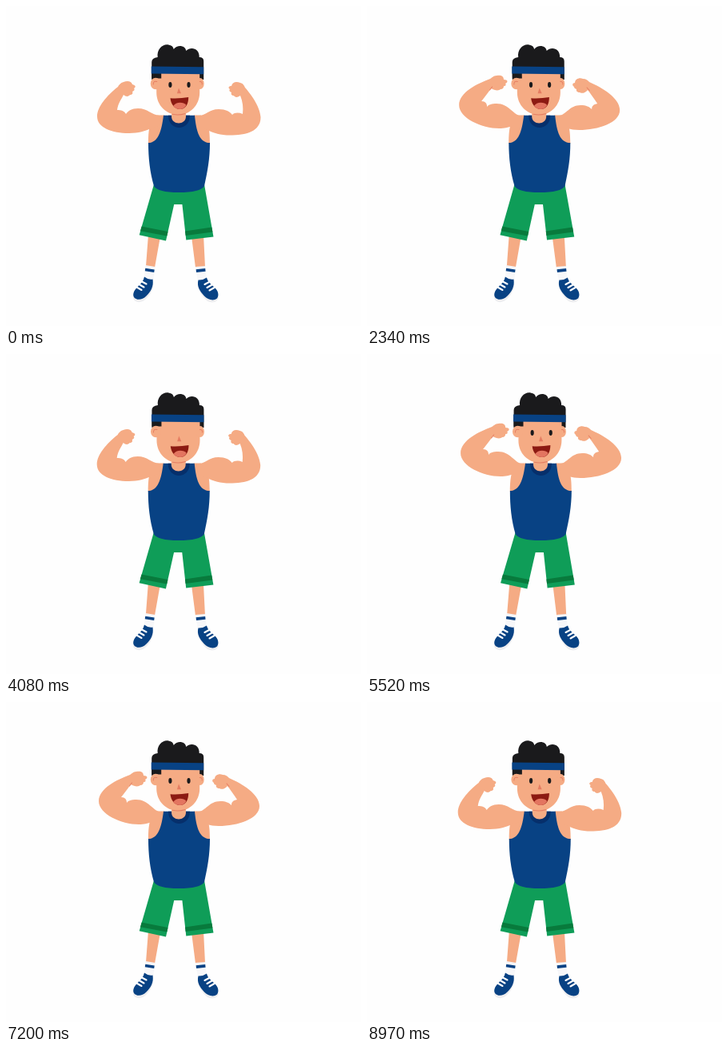
Write an HTML page that moves like this. It is 444x400 px and loops after 9000 ms.

```html
<!DOCTYPE html>
<html lang="en">
<head>
<meta charset="utf-8">
<title>Flexing athlete</title>
<style>
  html, body { margin: 0; width: 100%; height: 100%; overflow: hidden; background: #fefefe; }
  svg { display: block; width: 100vw; height: 100vh; }
  .skin { fill: #f5ab84; }
  .blue { fill: #084284; }
  .navy { fill: #062f6b; }
  .green { fill: #0f9d58; }
  .stripe { fill: #087a3c; }
  .hair { fill: #1a1a1c; }
  .line { fill: none; stroke: #e57d62; stroke-width: 1; stroke-linecap: round; }
  .lace { fill: none; stroke: #fff; stroke-width: 2.1; stroke-linecap: round; }
  .sole { fill: #eeeef0; }
  .sock { fill: #f7f7f9; }
</style>
</head>
<body>
<svg viewBox="0 0 444 400">
  <g id="figure">
    <g id="legs">
      <path class="skin" d="M178 286L193 288L186 327L175 325ZM232 288L247 286L249 326L237 327Z"/>
      <path class="sock" d="M174.500 324L186.500 326L184 344L172.500 341ZM237 326L249 325L251 341L240 344Z"/>
      <path class="blue" d="M174.300 327.700L185.700 329.500L185.200 333L173.800 331.200ZM237.600 329.300L249.200 328.100L249.600 331.700L238.100 332.900Z"/>
      <path class="sole" d="M184 347C184 356 179 363 173 368C167 372 160 370 159 365L165 356ZM240 348C241 357 246 364 252 369C258 372 265 370 266 364L259 356Z"/>
      <path class="blue" d="M173 338.500Q178 342.500 183.500 341.500C185 351 181 357 175.500 362.500C170 368 163 368 160 364C157.500 359 161.500 354 166 349.500Q171.500 345 173 338.500ZM240.500 342.500Q246 343 251 339.500C252.500 345.500 257 348 261 352C266 356.500 266.500 362 264 365.500C259 369.500 252 366.500 248 362.500C242 356 238.500 350 240.500 342.500Z"/>
      <path class="lace" d="M170 344.500L175.500 347.500M166.500 348L172.500 351.500M163.500 351.500L169.500 355M254 345L248.500 348M257.500 348.500L251.500 352M260.500 352L254.500 355.500"/>
    </g>
    <path class="green" d="M185 223L166.700 286.300L200 293.500L210.200 248H220.400L225.300 292.500L259.500 288.500L248 223Z"/>
    <path class="stripe" d="M169.600 275.500L202.500 282L201.300 287.500L168 281.200ZM224 281.500L257.300 276.500L258.400 282.500L224.700 287Z"/>

    <path class="skin" d="M198 136.500H189C181 143 178 149 178 172H198ZM235 136.500H244C252 143 255 149 255 172H235Z"/>
    <path id="armL" class="skin"/>
    <path id="armR" class="skin"/>
    <path id="creases" class="line" d="M154.500 105L157.500 101M276 102L279 105.500"/>

    <path class="blue" d="M197 136.700H236C238 157 242 171 255 171C255 191 252 207 248 225Q243 233 216 233Q190 233 185 225C180 208 178 190 178 171C190 171 194.500 157 197 136.700Z"/>
    <path class="navy" d="M203 136.700C203 157 230 157 230 136.700Z"/>
    <path class="skin" d="M207 128H225V138C225 149.300 207 149.300 207 138Z"/>

    <g id="head">
      <path class="hair" d="M182 92V70Q182 65 189.500 64C188 54 196 47 203 48.500C207 49 209 51 209.500 54C214 48 224 49 225 56C231 50 242 53 241.500 64Q247 64 247 69V92Z"/>
      <path class="skin" d="M188 84H242V108C242 124 230 136 215.500 136C200 136 188 124 188 108Z"/>
      <path class="line" d="M208 135.300Q216 137.200 224 134.600" stroke-width=".8"/>
      <path class="hair" d="M182 84H194V90.500H182Z"/>
      <ellipse class="skin" cx="187" cy="97" rx="6.500" ry="7.300"/>
      <ellipse class="skin" cx="242.500" cy="97" rx="5" ry="7"/>
      <path class="line" d="M184 98Q184 93 188.500 94.500M245 98Q245.500 94 242 94.500"/>
      <path class="blue" d="M181.500 75.600L247 76.300V85.200L181.500 84.500Z"/>
      <ellipse class="hair eye" cx="205.200" cy="98.500"/>
      <ellipse class="hair eye" cx="228.300" cy="98.500"/>
      <path d="M215.800 102.500L213.700 109.300H218.800Z" fill="#e57d62"/>
      <path d="M205.300 115.300Q217 116 228 114C228 122 225 129 217.500 129C210 129 206 122 205.300 115.300Z" fill="#8c1a12"/>
      <path d="M209 125C212 119.500 222 119.500 225.300 124Q222.500 129 217.500 129Q212 129 209 125Z" fill="#e37560"/>
    </g>
  </g>
</svg>
<script>
const LOOP = 9000, FLEX = 4500, SWAY = 900;
const GROUND = 362, LEAN = 0.006;
const HEAD_HEIGHT = 270, HEAD_LAG = 27, HEAD_OFFSET = 0.5;

// Each arm has a relaxed and a flexed outline with the same structure.
const arms = {
  armL: [
    'M192 137C182 136 177 128 165 128C157 128 153 131 150 135C148 131 144 130 139 130C140 122 144 117 147 111C150 114 154 113 155 111C158 111 159 109 158 107C161 106 161 104 160 103C163 101 162 99 158 98C157 94 152 93 147 95C143 96 141 99 140 101C126 112 114 126 114 138C114 152 132 159 154 159C166 159 174 156 182 153L192 150Z',
    'M192 137C184 136 178 122 163 122C157 122 153 123 151 126C151 122 149 119 144 119C147 115 152 109 156 103C161 106 166 106 168 104C171 104 172 102 172 100C175 100 175 98 174 97C178 95 177 92 172 92C172 87 168 86 163 87C159 87 157 90 155 91C139 97 116 108 116 124C116 140 144 153 166 153C173 153 177 152 182 150L192 150Z'
  ],
  armR: [
    'M241 137C250 137 254 129 266 129C275 129 280 132 283 136C286 133 291 133 296 135C297 127 296 119 293 112C289 115 286 114 285 112C282 112 281 110 282 108C279 107 279 105 280 104C277 102 279 100 282 100C283 95 288 94 293 96C297 97 298 100 299 102C306 110 317.500 125 318.500 139C318.500 157 300 161.500 280 161.500C268 161.500 260 159 252 155L241 152Z',
    'M241 137C250 136 254 124 268 124C275 124 279 126 282 129C282 125 284 123 289 122C285 116 281 110 277 105C273 110 268 109 267 108C264 108 262 106 263 104C260 103 260 102 260 101C257 99 258 96 261 96C261 91 267 89 271 91C275 91 277 93 279 95C295 102 317 115 317 130C317 146 290 155 266 155C260 155 256 154 251 153L241 152Z'
  ]
};

const byId = id => document.getElementById(id);
const eyes = document.querySelectorAll('.eye');
const ramp = (t, from, to) => {
  const x = Math.min(1, Math.max(0, (t - from) / (to - from)));
  return x * x * (3 - 2 * x);
};
const lean = t => LEAN * Math.sin(2 * Math.PI * t / SWAY);

function blend(a, b, k) {
  const target = b.match(/[\d.]+/g);
  let i = 0;
  return a.replace(/[\d.]+/g, n => (+n + (target[i++] - n) * k).toFixed(2));
}

function draw(time) {
  const t = time % LOOP, phase = t % FLEX;
  const flex = ramp(phase, 500, 1020) - ramp(phase, 3000, 3520);
  for (const id in arms) byId(id).setAttribute('d', blend(...arms[id], flex));
  byId('creases').setAttribute('opacity', ramp(flex, 0.8, 1));

  // The body leans from the ground up and the head follows slightly later.
  const k = lean(t);
  byId('figure').setAttribute('transform', `matrix(1 0 ${-k} 1 ${k * GROUND} 0)`);
  const drag = HEAD_OFFSET + (lean(t - HEAD_LAG) - k) * HEAD_HEIGHT;
  byId('head').setAttribute('transform', `translate(${drag} 0)`);

  const open = 1 - ramp(phase, 3950, 4040) + ramp(phase, 4120, 4210);
  for (const eye of eyes) {
    eye.setAttribute('rx', open > 0 ? 2.1 : 0);
    eye.setAttribute('ry', 3.4 * open);
  }
}

const start = performance.now();
function tick() {
  draw(performance.now() - start);
  requestAnimationFrame(tick);
}
tick();
</script>
</body>
</html>
```
